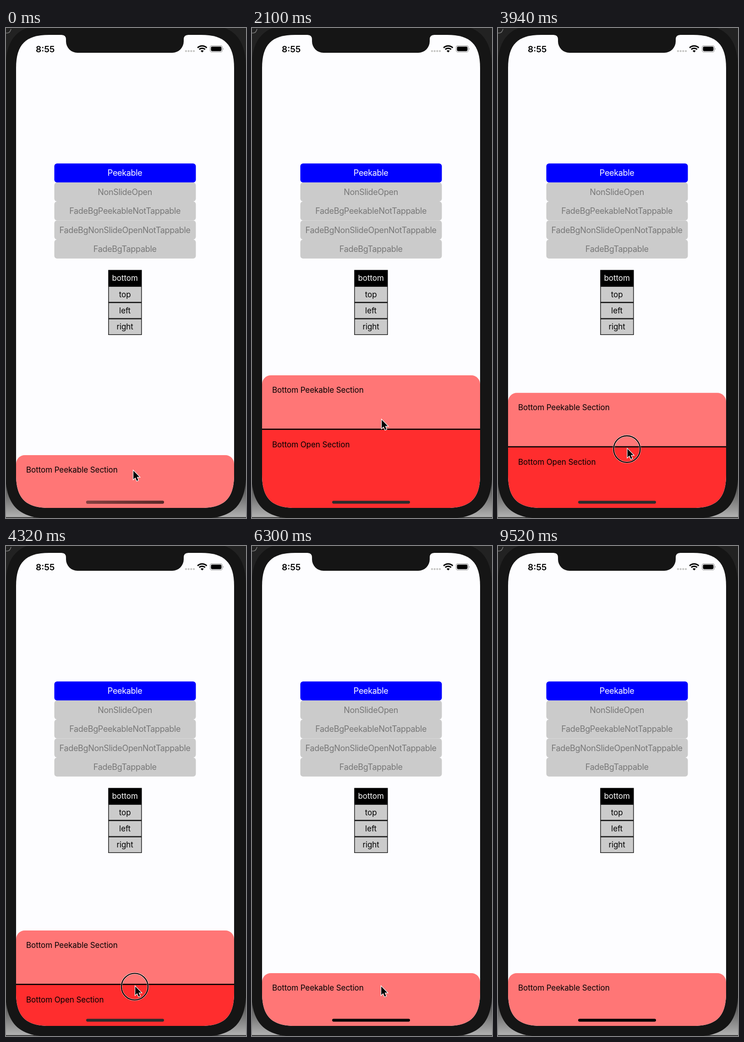
An HTML page for the animation above (9540 ms loop, 524 by 1068 pixels).

```html
<!DOCTYPE html>
<html lang="en">
<head>
<meta charset="utf-8">
<title>Bottom sheet demo</title>
<style>
  html, body { margin: 0; width: 100%; height: 100%; overflow: hidden; background: #151515; }
  svg { display: block; width: 524px; height: 1068px; }
  text { font-family: Inter, Roboto, "Liberation Sans", sans-serif; font-size: 17px; letter-spacing: -.004em; }
  .mid { text-anchor: middle; }
  .button { font-size: 18px; letter-spacing: -.018em; }
  .clock { font-size: 19px; font-weight: 600; letter-spacing: 0; }
</style>
</head>
<body>
<svg viewBox="0 0 524 1068">
  <defs>
    <linearGradient id="desk" x2="0" y2="1">
      <stop offset="0" stop-color="#3c3c3c"/>
      <stop offset="1" stop-color="#b4b4b4"/>
    </linearGradient>
    <linearGradient id="tint" x2="1" y2="0">
      <stop offset="0" stop-color="#874040"/>
      <stop offset="1" stop-color="#582828"/>
    </linearGradient>
    <clipPath id="screen"><path id="screenShape"/></clipPath>
  </defs>

  <rect width="524" height="1068" fill="#222"/>
  <path d="M0 11Q9 12 11 2" fill="none" stroke="#777" stroke-width="1.5"/>
  <rect y="985" width="524" height="83" fill="url(#desk)"/>
  <rect y="1066" width="524" height="2" fill="#3a3a3a"/>
  <path id="bezel" fill="#151515"/>

  <g clip-path="url(#screen)">
    <rect x="22" y="15" width="476" height="1031" fill="#fdfdff"/>
    <path d="M121 14V15Q131 15 131 25V29A25 25 0 0 0 156 54H363A25 25 0 0 0 388 29V25Q388 15 398 15V14Z" fill="#151515"/>
    <text class="clock" x="65" y="52.5">8:55</text>
    <g id="dots" fill="#c3c3c1"></g>
    <g fill="none" stroke="#000" stroke-width="3">
      <path d="M418.3 43.2A14.2 14.2 0 0 1 438.3 43.2"/>
      <path d="M421.9 46.8A9 9 0 0 1 434.7 46.8"/>
    </g>
    <path d="M428.3 53.2L424.9 49.8A4.8 4.8 0 0 1 431.7 49.8Z"/>
    <rect x="445.6" y="38.6" width="26.8" height="13.8" rx="4" fill="none" stroke="#9a9a9a" stroke-width="1.2"/>
    <rect x="447.5" y="40.5" width="23" height="10" rx="2.4"/>
    <path d="M473.8 43.2Q476.4 45.5 473.8 47.8Z" fill="#9a9a9a"/>
    <g id="buttons"></g>
    <g id="sides"></g>

    <g id="sheet">
      <path d="M22 118V19A19 19 0 0 1 41 0H479A19 19 0 0 1 498 19V118Z" fill="#ff7676"/>
      <rect x="22" y="118" width="476" height="300" fill="#ff2d2e"/>
      <rect x="22" y="116.2" width="476" height="2.6"/>
      <text x="44" y="38">Bottom Peekable Section</text>
      <text x="44" y="157">Bottom Open Section</text>
    </g>
    <rect id="home" x="175" y="1030.5" width="170" height="6.2" rx="3.1"/>
    <rect id="homeTint" x="175" y="1030.5" width="170" height="6.2" rx="3.1" fill="url(#tint)"/>
  </g>

  <g id="cursor">
    <g id="ring" fill="none">
      <circle cy="2.5" r="29" stroke="#fff" stroke-opacity=".6" stroke-width="4"/>
      <circle cy="2.5" r="29" stroke="#000" stroke-width="2.2"/>
    </g>
    <path d="M1.2 2V20.6L5.4 16.7L8.6 24L11.7 22.7L8.6 15.5H14.4Z" stroke="#fff" stroke-width="2.4" paint-order="stroke"/>
  </g>
</svg>
<script>
const LOOP = 9540;
const CLOSED = 931, OPEN = 753;
const up = { press: 350, start: 500, end: 1220, release: 1900 };
const down = { press: 3350, start: 3500, end: 4280, release: 5345 };
const HIDE = 6500;
const $ = id => document.getElementById(id);

const clamp = v => Math.max(0, Math.min(1, v));
const mix = (a, b, k) => a + (b - a) * k;
const ramp = (t, a, b) => clamp((t - a) / (b - a));
const smooth = k => k * k * (3 - 2 * k);

// Underdamped spring, 0 to 1, by seconds since release.
function spring(s) {
  const decay = 11, freq = Math.sqrt(230.2 - decay * decay);
  return 1 - Math.exp(-decay * s) * (Math.cos(freq * s) + decay / freq * Math.sin(freq * s));
}

// Rectangle with continuous corners.
function squircle(l, t, r, b, size, pull) {
  const s = size, p = pull;
  return `M${l + s} ${t}H${r - s}C${r - p} ${t} ${r} ${t + p} ${r} ${t + s}` +
    `V${b - s}C${r} ${b - p} ${r - p} ${b} ${r - s} ${b}` +
    `H${l + s}C${l + p} ${b} ${l} ${b - p} ${l} ${b - s}` +
    `V${t + s}C${l} ${t + p} ${l + p} ${t} ${l + s} ${t}Z`;
}

function build() {
  $('screenShape').setAttribute('d', squircle(22, 15, 498, 1046, 72, 21));
  $('bezel').setAttribute('d', squircle(-1, -8, 524, 1069, 96, 29));
  $('dots').innerHTML = [0, 1, 2, 3]
    .map(i => `<circle cx="${393 + i * 5.7}" cy="50.3" r="2.1"/>`).join('');

  const modes = ['Peekable', 'NonSlideOpen', 'FadeBgPeekableNotTappable',
    'FadeBgNonSlideOpenNotTappable', 'FadeBgTappable'];
  $('buttons').innerHTML = modes.map((name, i) => {
    const y = 295.2 + i * 41.45;
    return `<rect x="105.5" y="${y}" width="309" height="41.45" rx="6" fill="${i ? '#cbcbcb' : '#00f'}"/>` +
      `<text class="mid button" x="259.7" y="${y + 27.2}" fill="${i ? '#777' : '#fff'}">${name}</text>`;
  }).join('');

  $('sides').innerHTML = ['bottom', 'top', 'left', 'right'].map((name, i) => {
    const y = 527.4 + i * 35.4;
    return `<rect x="223.9" y="${y + .6}" width="72" height="34.2" stroke="#000" stroke-width="1.3" fill="${i ? '#cbcbcb' : '#000'}"/>` +
      `<text class="mid" x="259.6" y="${y + 23.8}" fill="${i ? '#000' : '#fff'}">${name}</text>`;
  }).join('');
}

function pointer(t) {
  const a = smooth(ramp(t, up.start, up.end));
  const b = smooth(ramp(t, down.start, down.end));
  return { x: 277 + 5 * a - b, y: 963 - 111 * a + 106 * b };
}

// The sheet follows a drag only past a small threshold.
function sheetTop(t, y) {
  if (t < up.release) return CLOSED - Math.max(0, 963 - y - 25);
  if (t < down.press) return mix(845, OPEN, spring((t - up.release) / 1000));
  if (t < down.release) return OPEN + Math.max(0, y - 852 - 21);
  return mix(838, CLOSED, spring((t - down.release) / 1000));
}

function draw(t) {
  const p = pointer(t);
  const held = [up, down].some(d => t >= d.press && t < d.release);
  $('sheet').setAttribute('transform', `translate(0 ${sheetTop(t, p.y).toFixed(2)})`);
  $('cursor').setAttribute('transform', `translate(${p.x.toFixed(2)} ${p.y.toFixed(2)})`);
  $('cursor').style.display = t < HIDE ? '' : 'none';
  $('ring').style.display = held ? '' : 'none';

  const shade = Math.round(44 * (1 - ramp(t, 5700, 6400)));
  $('home').setAttribute('fill', `rgb(${shade},${shade},${shade})`);
  $('homeTint').setAttribute('opacity', 1 - ramp(t, 500, 1000));
}

function tick() {
  draw(performance.now() % LOOP);
  requestAnimationFrame(tick);
}

build();
tick();
</script>
</body>
</html>
```
